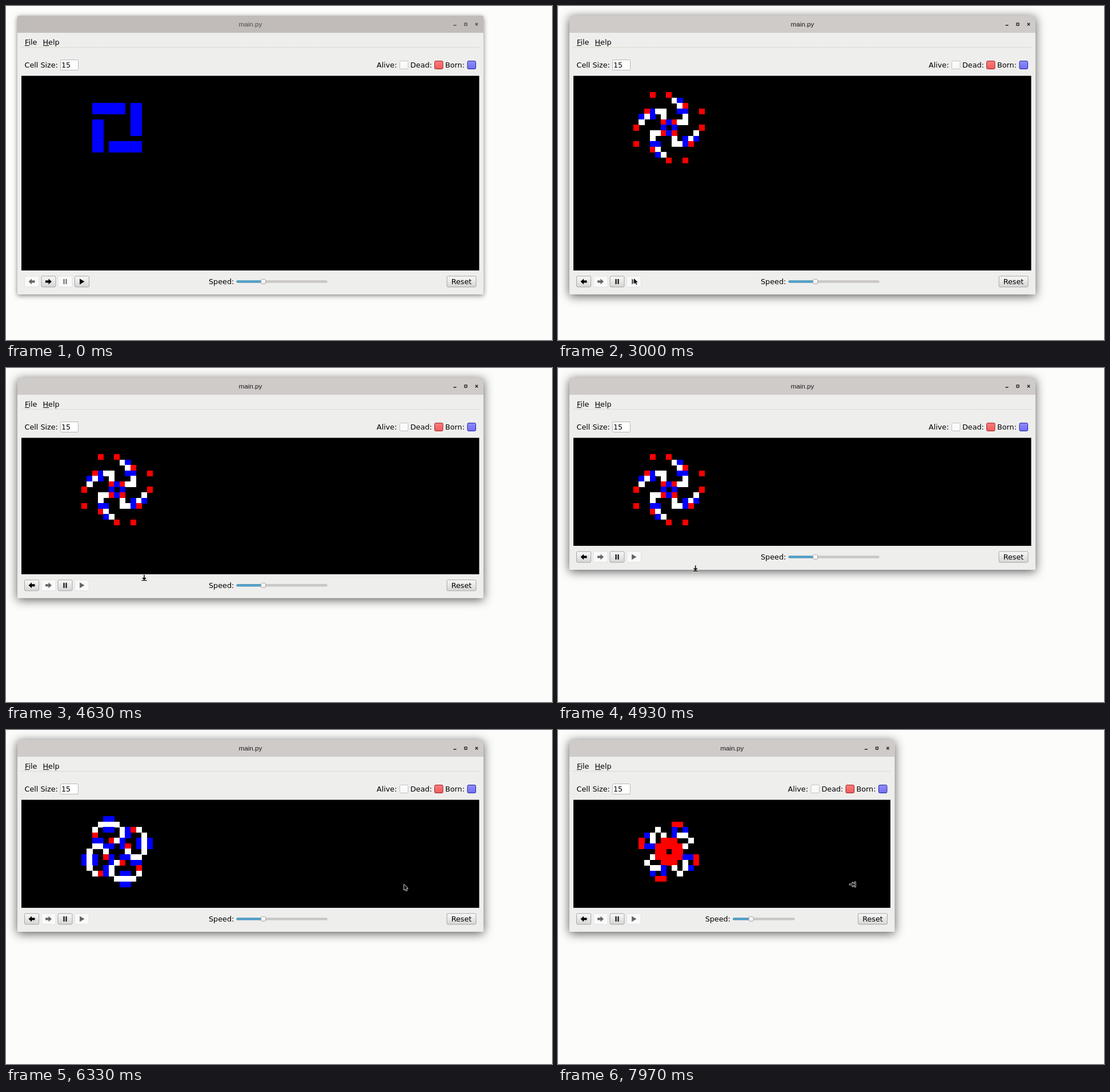
Animation, 956 px wide and 586 px high, one loop 8000 ms. Source, as an HTML page with a canvas:

```html
<!DOCTYPE html>
<html lang="en">
<head>
<meta charset="utf-8">
<title>main.py</title>
<style>
  html, body { margin: 0; width: 100%; height: 100%; overflow: hidden; background: #fcfcfb; }
  canvas { display: block; }
</style>
</head>
<body>
<canvas id="stage" width="956" height="586"></canvas>
<script>
const ctx = document.getElementById('stage').getContext('2d');
const LOOP = 8000, CLICK = 2190, STEP = 183;
const CELL = 9.57, GRID = 19, MID = 9;
const UI_FONT = '12.76px "DejaVu Sans", sans-serif';
const TITLE_FONT = '11.7px "Liberation Sans", Arial, sans-serif';

// Tables of [time, ...values], read with linear interpolation.
const bottomTrack = [[4400, 506], [4630, 404], [4930, 354]];
const rightTrack = [[7350, 836], [7510, 822], [7970, 589.5]];
const pointerTrack = [
  [480, 956, 330], [850, 780, 400], [1370, 287, 463], [1850, 150, 486], [2130, 133, 478],
  [3350, 133, 478], [3800, 412, 490], [4100, 330, 503], [4380, 244, 506], [4630, 242, 368],
  [4850, 240, 352], [5220, 243, 350], [5500, 325, 323], [6100, 580, 296], [6600, 833, 242],
  [7200, 835, 240.5], [7330, 826, 242], [7970, 515.5, 271]
];

function sample(track, t) {
  if (t <= track[0][0]) return track[0].slice(1);
  for (let i = 1; i < track.length; i++) {
    const a = track[i - 1], b = track[i];
    if (t <= b[0]) {
      const k = (t - a[0]) / (b[0] - a[0]);
      return a.slice(1).map((v, j) => v + (b[j + 1] - v) * k);
    }
  }
  return track[track.length - 1].slice(1);
}

// Game of Life
function seed() {
  const cells = new Uint8Array(GRID * GRID);
  for (let i = -4; i <= 1; i++) for (let j = -4; j <= -3; j++) {
    let x = i, y = j;
    for (let turn = 0; turn < 4; turn++) {
      cells[(y + MID) * GRID + x + MID] = 1;
      [x, y] = [-y, x];
    }
  }
  return cells;
}

function evolve(cells) {
  return cells.map((alive, i) => {
    let n = 0;
    for (const d of [-1, 1, -GRID, GRID, -GRID - 1, -GRID + 1, GRID - 1, GRID + 1]) n += cells[i + d] || 0;
    return n === 3 || (alive && n === 2) ? 1 : 0;
  });
}

const generations = [seed()];
while (generations.length < 23) generations.push(evolve(generations[generations.length - 1]));

// The simulation stalls while the window is being resized.
function generationAt(t) {
  if (t < 2340) return 0;
  if (t < 5400) return Math.min(12, 1 + Math.floor((t - 2340) / STEP));
  return Math.min(22, 13 + Math.floor((t - 5400) / STEP));
}

// Drawing helpers
function box(x, y, w, h, fill, stroke, r = 2) {
  ctx.beginPath();
  ctx.roundRect(x, y, w, h, r);
  ctx.fillStyle = fill;
  ctx.fill();
  if (stroke) {
    ctx.strokeStyle = stroke;
    ctx.lineWidth = 1;
    ctx.stroke();
  }
}

function gradient(y, h, top, end) {
  const g = ctx.createLinearGradient(0, y, 0, y + h);
  g.addColorStop(0, top);
  g.addColorStop(1, end);
  return g;
}

function text(str, x, y, color = '#000', font = UI_FONT, align = 'left') {
  ctx.font = font;
  ctx.textAlign = align;
  ctx.fillStyle = color;
  ctx.fillText(str, x, y);
}

function polygon(points, fill, stroke) {
  ctx.beginPath();
  points.forEach(([x, y]) => ctx.lineTo(x, y));
  ctx.closePath();
  if (stroke) {
    ctx.strokeStyle = stroke;
    ctx.lineWidth = 1.6;
    ctx.lineJoin = 'round';
    ctx.stroke();
  }
  ctx.fillStyle = fill;
  ctx.fill();
}

function button(x, y, w, enabled) {
  if (enabled) box(x + .5, y - 9.5, w - 1, 19, gradient(y - 10, 20, '#fafafa', '#d5d4d3'), '#aaa6a4');
  else box(x + .5, y - 9.5, w - 1, 19, '#f9f9f9', '#e2e1e0');
}

const arrowRight = [[-5.5, -2], [0, -2], [0, -5], [5.5, 0], [0, 5], [0, 2], [-5.5, 2]];
const icons = {
  back: c => polygon(arrowRight.map(([x, y]) => [-x, y]), c),
  next: c => polygon(arrowRight, c),
  pause: c => { ctx.fillStyle = c; ctx.fillRect(-3, -4.5, 2, 9); ctx.fillRect(1, -4.5, 2, 9); },
  play: c => polygon([[-4, -5], [4.5, 0], [-4, 5]], c)
};

function iconButton(cx, cy, name, enabled) {
  button(cx - 13, cy, 26, enabled);
  ctx.save();
  ctx.translate(cx, cy);
  icons[name](enabled ? '#000' : '#666');
  ctx.restore();
}

function mix(a, b, k) {
  return `rgb(${a.map((v, i) => Math.round(v + (b[i] - v) * k))})`;
}

function drawFrame(right, bottom, focus) {
  ctx.save();
  ctx.shadowColor = `rgba(0,0,0,${.5 + .15 * focus})`;
  ctx.shadowBlur = 9 + 8 * focus;
  ctx.shadowOffsetY = 2 + focus;
  box(20, 17, right - 20, bottom - 17, '#eeeeed', null, [3, 3, 1, 1]);
  ctx.restore();
  box(20, 17, right - 20, 30, mix([193, 188, 186], [207, 203, 201], focus), null, [3, 3, 0, 0]);

  const ink = mix([78, 76, 75], [28, 28, 28], focus);
  text('main.py', (20 + right) / 2, 36.3, ink, TITLE_FONT, 'center');
  ctx.fillStyle = ink;
  ctx.fillRect(right - 52.5, 33, 5, 1.5);
  ctx.strokeStyle = ink;
  ctx.lineWidth = 1.3;
  ctx.strokeRect(right - 33, 30, 4, 4);
  ctx.beginPath();
  for (const s of [-1, 1]) {
    ctx.moveTo(right - 14.2, 32 - 2.2 * s);
    ctx.lineTo(right - 9.8, 32 + 2.2 * s);
  }
  ctx.stroke();
}

function drawToolbar(right) {
  text('File', 33, 67.5);
  text('Help', 64.5, 67.5);
  ctx.fillRect(33, 69, 8, 1);
  ctx.fillRect(65, 69, 10, 1);
  ctx.strokeStyle = '#d5d1bd';
  ctx.lineWidth = 1;
  ctx.setLineDash([2, 1]);
  ctx.beginPath();
  ctx.moveTo(27, 72.5);
  ctx.lineTo(right - 7, 72.5);
  ctx.stroke();
  ctx.setLineDash([]);

  text('Cell Size:', 32.5, 107.7);
  box(95.5, 94.5, 31, 18, '#fff', '#bbb7b5');
  text('15', 97, 107.7);

  const legend = [
    ['Alive:', 187, 147, '#fdfdfd', '#f7f7f7', '#c6c2c0'],
    ['Dead:', 128, 86, '#ff7d7d', '#ee5b5b', '#a02020'],
    ['Born:', 67, 28.5, '#9090ff', '#6f6df0', '#2020a0']
  ];
  for (const [label, labelX, swatchX, top, end, edge] of legend) {
    text(label, right - labelX, 107.7);
    box(right - swatchX + .5, 96.5, 14.5, 14, gradient(96, 15, top, end), edge);
  }
}

function drawCells(index, right, bottom) {
  const now = generations[index], before = generations[index - 1] || new Uint8Array(GRID * GRID);
  ctx.fillStyle = '#000';
  ctx.fillRect(27, 122.5, right - 34.5, bottom - 42 - 122.5);
  now.forEach((alive, i) => {
    const was = before[i];
    if (!alive && !was) return;
    const x = 26.6 + (17 - MID + i % GRID) * CELL;
    const y = 122.3 + (9 - MID + Math.floor(i / GRID)) * CELL;
    const left = Math.round(x), top = Math.round(y);
    ctx.fillStyle = !alive ? '#f00' : was ? '#fff' : '#00f';
    ctx.fillRect(left, top, Math.round(x + 10.2) - left, Math.round(y + 10.2) - top);
  });
}

function drawControls(right, bottom, running) {
  const y = bottom - 22.5, shrink = 836 - right;
  iconButton(45, y, 'back', running);
  iconButton(74.5, y, 'next', !running);
  iconButton(103.5, y, 'pause', running);
  iconButton(133, y, 'play', !running);

  const x = 404 - shrink * .395, width = 158 - shrink * .207, knob = x + width * .295;
  text('Speed:', x - 49, y + 4.5);
  box(x, y - 1.5, width, 3, '#cfcdcb', '#bbb8b6', 1);
  box(x, y - 1.5, knob - x, 3, '#53a9d8', '#3e88b0', 1);
  box(knob - 4, y - 4, 8, 8, gradient(y - 4, 8, '#fff', '#ececec'), '#aaa6a4');

  button(right - 64.5, y, 52, true);
  text('Reset', right - 38.5, y + 4.5, '#000', UI_FONT, 'center');
}

const arrowShape = [[0, 0], [0, 9.5], [2.2, 7.6], [3.8, 11], [5.3, 10.3], [3.7, 7], [6.6, 6.8]];
const edgeShape = [[-5, -.8], [0, -.8], [0, -3.8], [4, -.3], [4, -4.5], [5.4, -4.5], [5.4, 4.5], [4, 4.5], [4, .3], [0, 3.8], [0, .8], [-5, .8]];

function drawPointer(t) {
  if (t < 480) return;
  const [x, y] = sample(pointerTrack, t);
  const vertical = t >= 4300 && t < 5230, horizontal = t >= 6590;
  ctx.save();
  ctx.translate(x, y);
  if (vertical) ctx.rotate(Math.PI / 2);
  polygon(vertical || horizontal ? edgeShape : arrowShape, '#111', '#e8e8e8');
  ctx.restore();
}

function draw(t) {
  const [right] = sample(rightTrack, t), [bottom] = sample(bottomTrack, t);
  const focus = Math.min(1, Math.max(0, (t - CLICK) / 150));
  ctx.fillStyle = '#fcfcfb';
  ctx.fillRect(0, 0, 956, 586);
  drawFrame(right, bottom, focus);
  drawToolbar(right);
  drawCells(generationAt(t), right, bottom);
  drawControls(right, bottom, t >= CLICK);
  drawPointer(t);
}

const start = performance.now();
function tick() {
  draw((performance.now() - start) % LOOP);
  requestAnimationFrame(tick);
}
tick();
</script>
</body>
</html>
```
